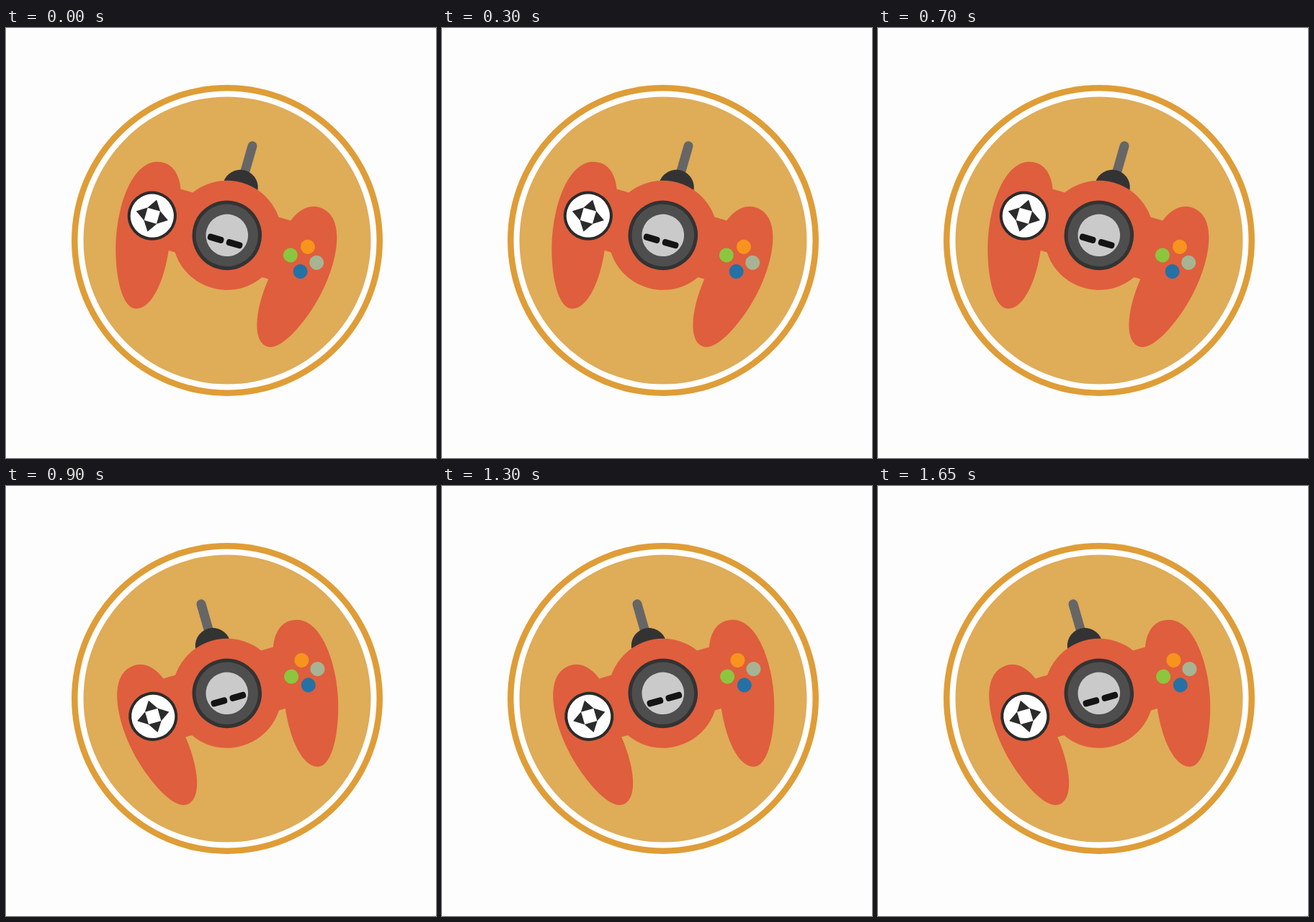
Animation of 597x597 px, one loop 1.75 s. Source, as an HTML page:

```html
<!DOCTYPE html>
<html lang="en">
<head>
<meta charset="utf-8">
<title>Dancing gamepad</title>
<style>
  html, body { margin: 0; width: 100%; height: 100%; overflow: hidden; background: #fdfdfd; }
  svg { display: block; width: 100vw; height: 100vh; }
</style>
</head>
<body>
<svg viewBox="0 0 597 597">
  <defs>
    <path id="wing" transform="rotate(-16) translate(-307 -288)"
      d="M243 225C241 200 229 186 210 186C174 186 152.5 252 152.5 306C152.5 352 163 390 181 390C203 390 220 350 226 309Z"/>
    <path id="arrow" d="M0-23L9.3-9H-9.3Z"/>
  </defs>

  <circle cx="307" cy="295" r="216" fill="#df9d37"/>
  <circle cx="307" cy="295" r="207.5" fill="#fff"/>
  <circle cx="307" cy="295" r="199.5" fill="#dfac58"/>

  <!-- Gamepad, drawn upright around its pivot -->
  <g id="pad">
    <path d="M-.3-129V-80" stroke="#666" stroke-width="13" stroke-linecap="round"/>
    <circle cx="-.5" cy="-69" r="24.5" fill="#333"/>

    <g fill="#df5e3d">
      <use href="#wing"/>
      <use href="#wing" transform="scale(-1 1)"/>
      <rect x="-79" y="-44" width="158" height="86.5"/>
      <circle r="76"/>
    </g>

    <g transform="translate(-107.4 2.6)" fill="#2b2b2b">
      <circle r="32" fill="#fff" stroke="#2b2b2b" stroke-width="4"/>
      <use href="#arrow"/>
      <use href="#arrow" transform="rotate(90)"/>
      <use href="#arrow" transform="rotate(180)"/>
      <use href="#arrow" transform="rotate(270)"/>
    </g>

    <circle cx="112.3" cy="-15.5" r="10" fill="#f8941d"/>
    <circle cx="92.3" cy="2.3" r="10" fill="#8cc63e"/>
    <circle cx="130.1" cy="2.2" r="10" fill="#a6b493"/>
    <circle cx="111.8" cy="20.2" r="10" fill="#2471a5"/>

    <circle r="45.7" fill="#4e4e4e" stroke="#333" stroke-width="5"/>
    <circle r="29.3" fill="#cacaca"/>
    <g fill="#141414">
      <rect x="-25.3" y="4.1" width="23" height="9" rx="4"/>
      <rect x="1.7" y="4.1" width="23" height="9" rx="4"/>
    </g>
  </g>
</svg>
<script>
  const LOOP = 1750;
  const TILT = 16;
  const flips = [100, 300, 450, 700, 900, 1100, 1300, 1450, 1650];
  const pad = document.getElementById("pad");
  const start = performance.now();

  // The pad snaps to the other side at every flip time.
  function draw() {
    const time = (performance.now() - start) % LOOP;
    const passed = flips.filter(flip => flip <= time).length;
    const angle = passed % 2 ? -TILT : TILT;
    pad.setAttribute("transform", `translate(306.8 287.8) rotate(${angle})`);
    requestAnimationFrame(draw);
  }
  draw();
</script>
</body>
</html>
```
